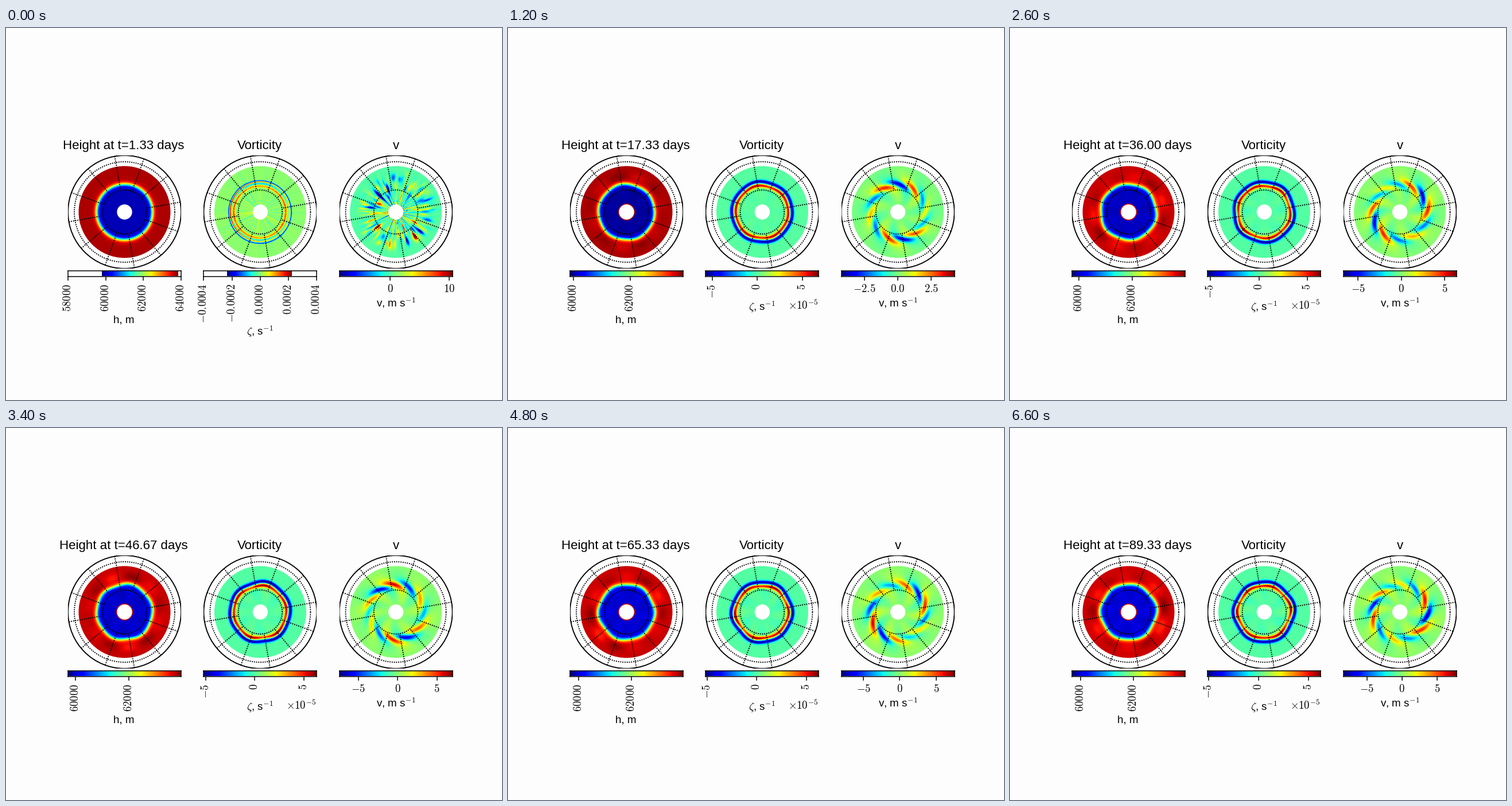
Recreate the animation shown at these times as a matplotlib script. Size 864 by 648 pixels, loop 6800 ms.

```python
import numpy as np
import matplotlib.pyplot as plt
from matplotlib.animation import FuncAnimation
from matplotlib.patches import Circle
from matplotlib.ticker import MaxNLocator

plt.rcParams.update({
    "font.family": "Liberation Sans",
    "font.size": 10,
    "mathtext.fontset": "cm",
})

W, H, DPI = 864, 648, 135
FRAMES, INTERVAL = 34, 200
PAPER = "#fdfdfd"
R_MAP, R_DATA, R_HOLE, R_JET = 98.5, 80, 13.2, 48.5
START = 6  # step at which the wave has emerged from the noise

axis = np.arange(197) - 98.0
X, Y = np.meshgrid(axis, axis)
R = np.hypot(X, Y)
TH = np.degrees(np.arctan2(Y, X))
RING = np.arange(720) / 2
LOBE = np.arange(12)


def bump(x, s):
    return np.exp(-0.5 * (x / s) ** 2)


def wrap(a):
    return (a + 180) % 360 - 180


def make_noise():
    """Start-up noise for vorticity and v."""
    rng = np.random.default_rng(4)
    rays = np.interp(TH, np.arange(240) * 1.5, rng.normal(size=240), period=360)
    v = 4 * rays * np.exp(-(R - 13) / 16)
    for _ in range(320):
        a, r = rng.uniform(0, 360), rng.normal(48, 13)
        size = rng.normal(0, 3.3)
        v += size * bump(wrap(TH - a), rng.uniform(1, 2.6)) * bump(R - r, rng.uniform(4, 9))
    v *= 1 / (1 + np.exp((R - 66) / 4))

    c, s = np.cos(np.radians(TH)), np.sin(np.radians(TH))
    zeta = 3.5 * rays * np.exp(-(R - 13) / 25)
    zeta += 20 * (0.7 - 0.3 * c) * bump(R - 51.8 - 0.8 * s, 0.7)
    zeta -= 17 * bump(R - 54.6, 0.7)
    zeta -= 9 * np.abs(s) * bump(R - 49.5, 1.5)
    zeta += 14 * (0.7 + 0.3 * np.abs(c)) * bump(R - 45.3 + 0.6 * c, 1.6)
    return zeta, np.clip(v, -8.6, 10.4)


NOISE_Z, NOISE_V = make_noise()
RADIAL = bump(R - 48, 6.3) + 0.13 * bump(R - 30, 9) + 0.1 * bump(R - 64, 8)
SHEARED = TH - 20 * np.tanh((R - 48) / 10) - 0.3 * (R - 48)


def noise_level(i):
    return np.exp(-i / 1.2)


def growth(i):
    """Wave growth, 0 at the start and close to 1 at the end."""
    return 1 - np.exp(-max(0, i - START) / 8)


def limits(i):
    """Colour limits of height (m), vorticity (1e-5 / s) and v (m / s)."""
    g, e = growth(i), noise_level(i)
    pulse = np.cos(2 * np.pi * (i - 20) / 7.8)
    h = 59890 - 235 * g - 90 * e, 63840 + (165 + 35 * pulse) * g + 10 * e
    zeta = -5.61 + 0.53 * g - 18 * e, 6.74 - 0.55 * g + 15.3 * e
    v = -4.2 - 4.3 * g - 4.4 * e, 4.2 + 3.7 * g + 6.3 * e
    return h, zeta, v


def lobes(i):
    """Angle and relative size of the twelve lobes drifting round the pole."""
    n = i - START
    angle = 3 + 8.07 * n - 0.03 * n ** 2 + 30 * LOBE
    angle = angle + 7 * np.cos(np.pi / 6 * (LOBE - 8.5 - 0.38 * n))
    size = 0.72 + 0.25 * np.cos(np.pi / 3 * (LOBE - 2.9 - 0.31 * n))
    return angle, size


def fields(i):
    _, (z_lo, z_hi), (v_lo, v_hi) = limits(i)
    noise = noise_level(i)
    angle, size = lobes(i)
    size = size * np.where(LOBE % 2, v_lo, v_hi) * (1 - noise)

    v = np.zeros_like(R)
    ring = np.zeros_like(RING)
    for a, s in zip(angle, size):
        v += s * bump(wrap(SHEARED - a), 13.5)
        ring += s * bump(wrap(RING - a), 13.5)
    v *= RADIAL

    # The jet's edge bends with the integral of v along the circle
    spec = np.fft.rfft(ring)
    m = np.arange(len(spec))
    spec[:3] = 0
    edge = np.fft.irfft(-1.35 * spec / (1j * np.maximum(m, 1)), len(RING))
    bend = np.interp(TH, RING, edge, period=360)

    r = R - bend * bump(R - R_JET, 14)
    h = 61840 + 1840 * np.tanh((r - R_JET) / 4)
    h += 150 * bend * bump(R - 62, 6) + 60 * v * bump(R - 28, 10)
    if i > 0:
        h[R < 14.6] = 63650

    zeta = z_hi * (0.88 + 0.08 * bend) * bump(r - 45.8, 2.4)
    zeta += z_lo * (0.95 + 0.04 * bend) * bump(r - 52.4, 2.4)
    zeta = zeta * (1 - noise) + 0.3 * v * bump(R - 28, 10)
    return h, zeta + noise * NOISE_Z, v + noise * NOISE_V


def px_axes(x, top, w, h):
    return fig.add_axes([x / W, 1 - (top + h) / H, w / W, h / H])


def px_text(x, y, s, **kw):
    kw.setdefault("ha", "center")
    return fig.text(x / W, 1 - y / H, s, va="baseline", **kw)


def draw_map(x):
    ax = px_axes(x, 222, 197, 197)
    ax.set_axis_off()
    im = ax.imshow(np.zeros_like(R), cmap="jet", origin="lower",
                   interpolation="bilinear", extent=[-98.5, 98.5] * 2)
    ax.add_patch(Circle((0, 0), R_MAP, fc="white", ec="none", zorder=-1))
    im.set_clip_path(Circle((0, 0), R_DATA, transform=ax.transData))
    ax.add_patch(Circle((0, 0), R_HOLE, fc="white", ec="none", zorder=2))
    dots = dict(color="black", lw=1, ls=(0, (1, 1)), zorder=3)
    t = np.linspace(0, 2 * np.pi, 361)
    for r in (38.3, 87.5):
        ax.plot(r * np.cos(t), r * np.sin(t), **dots)
    ends = np.array([R_MAP, 38.3])
    for a in np.radians(np.arange(10, 360, 30)):
        ax.plot(ends * np.cos(a), ends * np.sin(a), **dots)
    ax.add_patch(Circle((0, 0), R_MAP, fc="none", ec="black", lw=1, zorder=4))
    ax.set(xlim=(-98.5, 98.5), ylim=(-98.5, 98.5))
    return im


def draw_bar(x, rotation):
    ax = px_axes(x, 422.5, 197, 10)
    ax.set_facecolor("white")
    im = ax.imshow(np.linspace(0, 1, 256)[None], cmap="jet", aspect="auto",
                   extent=[0, 1, 0, 1])
    ax.set_yticks([])
    ax.tick_params(axis="x", rotation=rotation)
    return ax, im


fig = plt.figure(figsize=(W / DPI, H / DPI), dpi=DPI, facecolor=PAPER)
LEFTS = (108, 344.4, 580.6)
maps = [draw_map(x) for x in LEFTS]
bars = [draw_bar(x, rot) for x, rot in zip(LEFTS, (90, 90, 0))]

title = px_text(205, 210.5, "", fontsize=11.9)
px_text(442.3, 210.5, "Vorticity", fontsize=11.9)
px_text(679, 210.5, "v", fontsize=11.9)
px_text(205.3, 514, "h, m")
zeta_label = px_text(442.3, 492, r"$\zeta$, s$^{-1}$")
power = px_text(540, 490, r"$\times 10^{-5}$", ha="right")
px_text(679, 485, "v, m s$^{-1}$")

locator = MaxNLocator(3, steps=[1, 2, 2.5, 5, 10], min_n_ticks=2)


def set_bar(bar, lo, hi, ticks=None, scale=1, digits=None):
    """Given ticks also set the bar's span; otherwise the limits do."""
    ax, im = bar
    im.set_extent([lo, hi, 0, 1])
    if ticks is None:
        ticks = [t for t in locator.tick_values(lo, hi) if lo <= t <= hi]
        span = lo, hi
    else:
        span = ticks[0], ticks[-1]
    if digits is None:
        digits = 0 if all(float(t).is_integer() for t in ticks) else 1
    ax.set_xticks(ticks, [f"${t * scale:.{digits}f}$" for t in ticks])
    ax.set(xlim=span, ylim=(0, 1))


def update(i):
    lims = limits(i)
    for im, data, lim in zip(maps, fields(i), lims):
        im.set_data(data)
        im.set_clim(*lim)
    first = i == 0
    if first:
        set_bar(bars[0], *lims[0], ticks=np.arange(58000, 64001, 2000))
        set_bar(bars[1], *lims[1], ticks=np.arange(-40, 41, 20), scale=1e-5, digits=4)
    else:
        set_bar(bars[0], *lims[0])
        set_bar(bars[1], *lims[1])
    set_bar(bars[2], *lims[2])
    title.set_text(f"Height at t={(4 + 8 * i) / 3:.2f} days")
    zeta_label.set_y(1 - (535 if first else 492) / H)
    power.set_visible(not first)
    return []


anim = FuncAnimation(fig, update, frames=FRAMES, interval=INTERVAL,
                     init_func=lambda: [], repeat=True, repeat_delay=0, blit=False)
plt.show()
```
